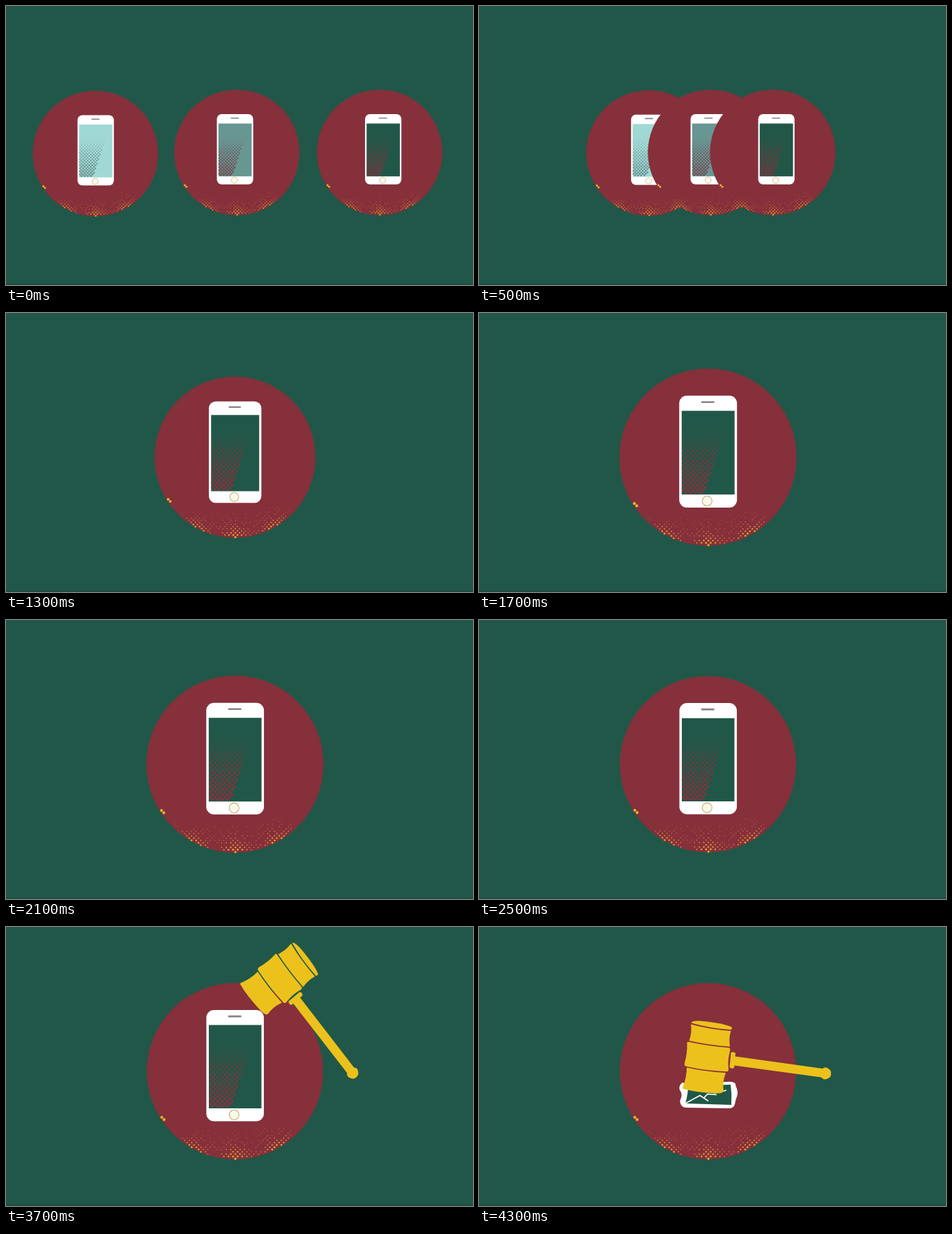
These frames come from a looping animation (670x400 px, 4800 ms). An HTML page with a canvas:

```html
<!DOCTYPE html>
<html lang="en">
<head>
<meta charset="utf-8">
<title>Phones and gavel</title>
<style>
html, body { margin: 0; width: 100%; height: 100%; overflow: hidden; background: #215748; }
canvas { display: block; width: 670px; height: 400px; }
</style>
</head>
<body>
<canvas id="stage"></canvas>
<script>
const LOOP = 4800, STEP = 100;
const GREEN = '#215748', RED = '#85303b', GOLD = '#ecc11c';
const R = 126.5, SMALL = 90 / R, SMALL_PHONE = 0.632;
const canvas = document.getElementById('stage');
const ctx = canvas.getContext('2d');
const dpr = window.devicePixelRatio || 1;
canvas.width = 670 * dpr;
canvas.height = 400 * dpr;

const clamp = v => Math.min(1, Math.max(0, v));
const mix = (a, b, p) => a + (b - a) * p;
const span = (t, a, b) => clamp((t - a) / (b - a));
const rand = (i, j) => {
  const v = Math.sin(i * 127.1 + j * 311.7) * 43758.5453;
  return v - Math.floor(v);
};

function disc(x, y, r, color) {
  ctx.fillStyle = color;
  ctx.beginPath();
  ctx.arc(x, y, r, 0, Math.PI * 2);
  ctx.fill();
}

function box(x, y, w, h, r, color) {
  ctx.fillStyle = color;
  ctx.beginPath();
  ctx.roundRect(x, y, w, h, r);
  ctx.fill();
}

function within(draw) {
  ctx.save();
  draw();
  ctx.restore();
}

// Staggered halftone lattice: visit(x, y, column, row)
function lattice(x0, x1, y0, y1, gap, visit) {
  for (let j = 0, y = y0; y <= y1; j++, y += gap / 2) {
    const shift = j % 2 ? gap / 2 : 0;
    for (let i = 0, x = x0 + shift; x <= x1; i++, x += gap) visit(x, y, i, j);
  }
}

// Rim dots thicken in three clumps: left, bottom and right
const rimDots = [];
lattice(-105, 115, 66, 126, 6.6, (x, y, i, j) => {
  if (Math.hypot(x, y) > R - 1) return;
  const top = 84 - Math.max(0, x - 15) * 0.17;
  const u = (y - top) / (Math.sqrt(R * R - x * x) - top + 6);
  if (u < 0) return;
  const clump = 0.5 + 0.5 * Math.cos(x / 9.5);
  const p = clamp(u * (0.5 + 0.5 * clump));
  if (rand(i, j) > 0.2 + 1.1 * p) return;
  rimDots.push({
    x, y, r: 0.6 + 1.5 * p * p,
    color: `rgb(${mix(176, 236, p)},${mix(84, 176, p)},${mix(56, 48, p)})`
  });
});

const screenDots = [];
lattice(2, 60, 22, 119, 7, (x, y) => {
  if (x > 58 - (y - 36) * 0.33) return;
  const u = (y - 20) / 99;
  screenDots.push({ x, y, r: 0.5 + 1.75 * Math.pow(u, 0.8), alpha: clamp(u * 2.4) });
});

function badge(x, y, scale) {
  within(() => {
    ctx.translate(x, y);
    ctx.scale(scale, scale);
    disc(0, 0, R, RED);
    for (const d of rimDots) disc(d.x, d.y, d.r, d.color);
  });
}

function phone(x, y, sx, sy, screen, dots) {
  within(() => {
    ctx.translate(x, y);
    ctx.scale(sx, sy);
    box(-41.25, -79.75, 82.5, 159.5, 11, '#fff');
    box(-10, -72, 19, 2.6, 1, '#8a8085');
    disc(-1.4, 70.4, 7, '#fcf9ea');
    ctx.strokeStyle = '#bfae7c';
    ctx.lineWidth = 1.1;
    ctx.stroke();
    ctx.translate(-37.7, -58.2);
    box(0, 0, 75.5, 119.5, 0, screen);
    ctx.beginPath();
    ctx.rect(0, 0, 75.5, 119.5);
    ctx.clip();
    for (const d of screenDots) {
      ctx.globalAlpha = d.alpha;
      disc(d.x, d.y, d.r, dots);
    }
  });
}

const shell = new Path2D('M292 223Q286 227 288 234Q292 239 290 245Q287 250 290 255Q292 259 298 259L360 260Q366 259 367 254Q368 248 370 243Q372 238 370 232Q368 228 368 225Q365 221 356 222L298 225Z');
const glass = new Path2D('M300 228L361 226Q363 240 362 255L296 253Q300 240 300 228Z');
const cracks = new Path2D('M296 253L317 241.5L329 249.5M322 245.5L328 239.5L341 240.5M337 238L348 236L355 234');

function crushed(stretch) {
  within(() => {
    ctx.translate(329, 0);
    ctx.scale(stretch, 1);
    ctx.translate(-329, 0);
    ctx.fillStyle = '#fff';
    ctx.fill(shell);
    ctx.fillStyle = GREEN;
    ctx.fill(glass);
    ctx.strokeStyle = '#fff';
    ctx.lineWidth = 1.7;
    ctx.stroke(cracks);
  });
}

const gavelParts = [
  'M304.500 137.500Q305 134 318 134.700Q352 138 362.500 143.500Q363.500 146 361.500 147.300Q332 145.500 304.500 137.500Z',
  'M304 139.500Q332 147 361.500 149Q358 159 360 171.500Q330 169.500 301.500 163Q306 151 304 139.500Z',
  'M298.500 167Q298 164.500 301 164.800Q330 171 358.500 173Q361 174 360 178Q356.500 190 358 204Q358 207.500 355 207.200Q325 206 297 199.700Q294 198.500 295 195Q299 181 298.500 167Z',
  'M298 201.500Q325 207.500 354 209Q349 222 351 235Q350 239 340 238.500Q310 237 293 232Q291 231 293 228Q298 215 298 201.500Z',
  'M361.500 180Q365 178 368 181L367.500 185.500L493 203Q497 199.500 501 203Q505.500 205 505 210Q505.500 215 501 217Q495 220.500 491 215.500L366.500 198.500L366 202Q362 204 359.500 201Z'
].map(d => new Path2D(d));

function gavel(deg) {
  within(() => {
    ctx.translate(498, 210);
    ctx.rotate(deg * Math.PI / 180);
    ctx.translate(-498, -210);
    ctx.fillStyle = GOLD;
    for (const part of gavelParts) ctx.fill(part);
  });
}

// [circle x, circle y, phone offset, screen colour, dot colour]
const trio = [
  [128.3, 211.5, 0.4, '#a0d9d4', '#6c8f90'],
  [331.2, 210, -2.6, '#689693', '#73464e'],
  [536, 210, 5.2, GREEN, '#7e333d']
];

function merge(t) {
  const p = Math.pow(span(t, 0, 700), 1.7);
  for (const [x, y, dx, screen, dots] of trio) {
    const cx = mix(x, 333, p), cy = mix(y, 210, p);
    badge(cx, cy, SMALL);
    phone(cx + dx, cy - 4.6, SMALL_PHONE, SMALL_PHONE, screen, dots);
  }
}

// Accelerating growth, then a damped wobble carrying the same speed
function radius(t) {
  const end = 1430;
  if (t < end) return mix(90, R, Math.pow(span(t, 800, end), 1.545));
  const s = (t - end) / 1000;
  return R + 8.3 * Math.exp(-4 * s) * Math.sin(10.8 * s);
}

function swing(t) {
  if (t < 3600) return mix(40, 55, Math.sin(span(t, 3400, 3600) * Math.PI / 2));
  return 55 * (1 - Math.pow(span(t, 3600, 3850), 1.8));
}

function strike(t) {
  const scale = radius(t) / R;
  badge(328.5, 206.8, scale);
  const angle = swing(t);
  const face = 210 - 207 * Math.sin((angle - 6) * Math.PI / 180);
  const squash = t < 3600 ? 0 : clamp((face - 119) / 104);
  if (t >= 3900) {
    crushed(mix(1.15, 1, span(t, 3900, 4000)));
  } else {
    const top = 119 + 104 * squash, bottom = 278.5 - 18.5 * squash;
    const y = squash ? (top + bottom) / 2 : 206.8 - 8 * scale;
    phone(328.7, y, scale, scale * (bottom - top) / 159.5, GREEN, '#8a303c');
  }
  if (t >= 3400) gavel(angle);
}

function frame(now) {
  const t = Math.floor(((now - start) % LOOP) / STEP) * STEP;
  ctx.setTransform(dpr, 0, 0, dpr, 0, 0);
  box(0, 0, 670, 400, 0, GREEN);
  box(0, 398.5, 670, 1.5, 0, '#1c4a3e');
  if (t < 900) merge(t); else strike(t);
  requestAnimationFrame(frame);
}

const start = performance.now();
frame(start);
</script>
</body>
</html>
```
